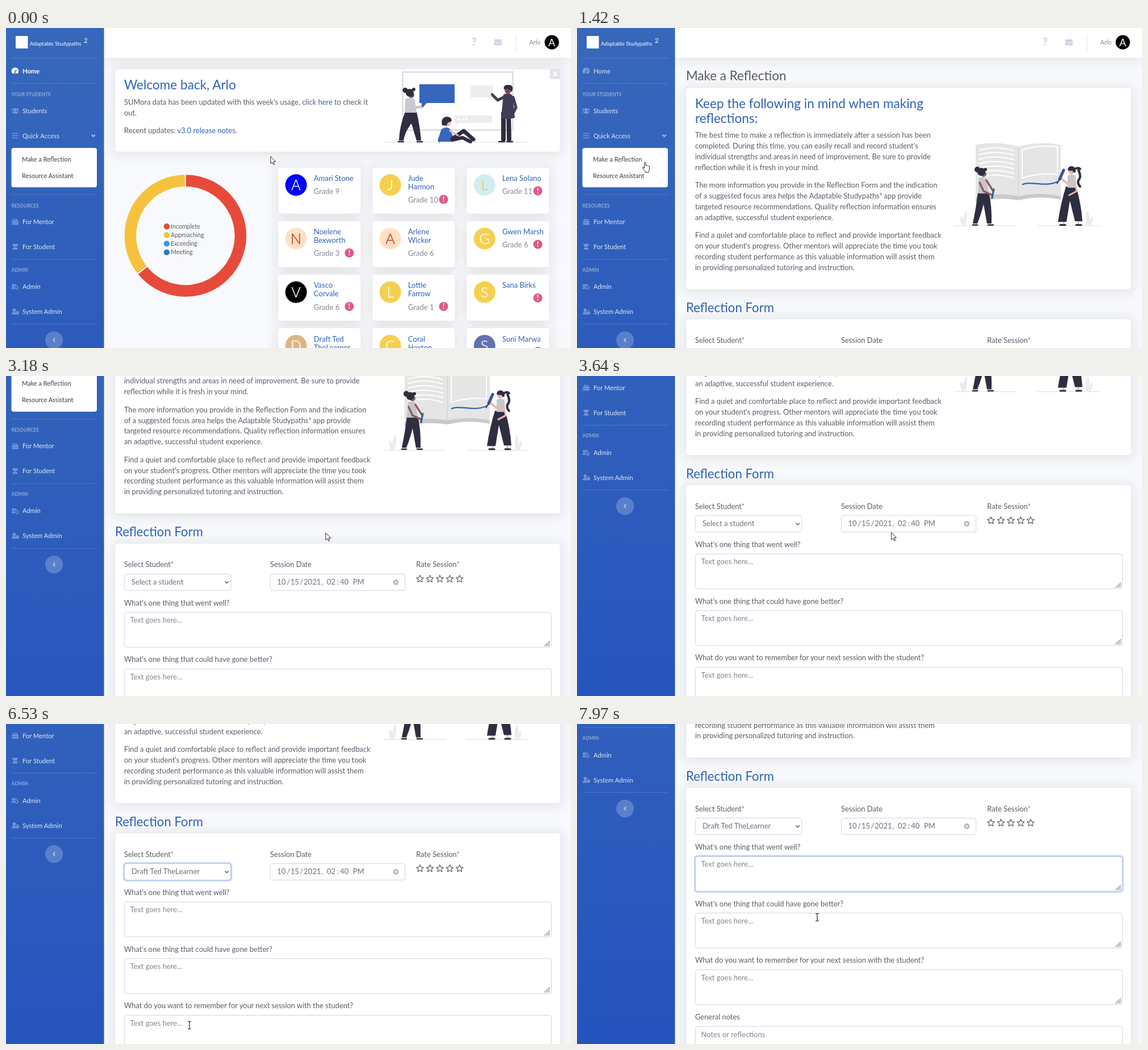
Write an HTML page that moves like this. It is 995x563 px and loops after 8000 ms.

```html
<!DOCTYPE html>
<html lang="en">
<head>
<meta charset="utf-8">
<title>Session reflection</title>
<style>
html, body { margin: 0; width: 100%; height: 100%; overflow: hidden; background: #f8f9fc; }
svg { display: block; width: 100vw; height: 100vh; font-family: Lato, "Open Sans", sans-serif; }
text { white-space: pre; }
.list { font-family: "Open Sans", "Noto Sans", sans-serif; font-size: 12px; }
</style>
</head>
<body>
<svg id="stage" viewBox="0 0 995 563" xmlns="http://www.w3.org/2000/svg"></svg>
<script>
const LOOP = 8000;
const BLUE = '#2d62b8', INK = '#5a5c69', SOFT = '#858796', DARK = '#2f2e41', BRAND = 'Adaptable Studypaths';

// ---- drawing helpers ----
const text = (x, y, s, size = 12.9, fill = INK, more = '') =>
  `<text x="${x}" y="${y}" font-size="${size}" fill="${fill}" ${more}>${s}</text>`;
const rect = (x, y, w, h, fill, r = 0, more = '') =>
  `<rect x="${x}" y="${y}" width="${w}" height="${h}" rx="${r}" fill="${fill}" ${more}/>`;
const dot = (x, y, r, fill) => `<circle cx="${x}" cy="${y}" r="${r}" fill="${fill}"/>`;
const shape = (d, fill) => `<path d="${d}" fill="${fill}"/>`;
const line = (d, color, w = 1, more = '') =>
  `<path d="${d}" fill="none" stroke="${color}" stroke-width="${w}" ${more}/>`;
const round = 'stroke-linecap="round" stroke-linejoin="round"';
const limb = (d, color, w) => line(d, color, w, round);
const group = (id, s, more = '') => `<g id="${id}" ${more}>${s}</g>`;
const card = (x, y, w, h) => rect(x, y, w, h, '#fff', 4, 'stroke="#e3e6f0" stroke-width=".8"');
const shadowed = s => `<g filter="url(#shade)">${s}</g>`;
const each = (list, fn) => list.map(fn).join('');

// ---- sidebar ----
const people = dot(16, -2.2, 2.6, '#fff') + dot(11.8, -2, 1.7, '#fff') + dot(20.2, -2, 1.7, '#fff') +
  shape('M11.7 5 q0 -4.3 4.3 -4.3 t4.3 4.3z M9.5 3.3 q0 -2.7 2.5 -2.7 l-1.3 2.7z M22.5 3.3 q0 -2.7 -2.5 -2.7 l1.3 2.7z', '#fff');
const person = dot(14.5, -2.6, 2.9, '#fff') + shape('M10 5 q0 -4.6 4.5 -4.6 q2 0 3 1 v3.6z', '#fff');
const icons = {
  gauge: shape('M11.2 4.5 a6.3 6.3 0 1 1 9.6 0z', '#fff') + line('M15.7 2.3 L18.4 -2.6', '#3767bd', 1.3) + dot(15.7, 2.3, 1.5, '#3767bd'),
  people,
  bars: line('M10.5 -4 h11 M10.5 0 h11 M10.5 4 h11', '#fff', 1.4),
  box: line('M13 -1.5 v-2.7 h6 v2.7', '#fff', 1.5) + rect(10.5, -1.8, 11.5, 7, '#fff', 1.2) + line('M10.5 1.7 h11.5', '#3161ba', .8),
  grad: shape('M11 -5 h10 v2 h-1.5 v3 h-7 v-3 h-1.5z M11.5 5 q0 -4 4.5 -4 t4.5 4z', '#fff'),
  cog: dot(12.5, -2, 2.4, '#fff') + shape('M9.5 4 q0 -3.6 3.5 -3.6 q2 0 2.5 3.6z', '#fff') + dot(16.8, -3, 1.7, '#fff') +
    `<circle cx="18.7" cy="2" r="2.6" fill="none" stroke="#fff" stroke-width="1.8" stroke-dasharray="1.7 .4"/>`,
  lock: person + rect(17.8, 0, 5, 5, '#fff', .8) + line('M18.9 .5 v-1.2 a1.4 1.4 0 0 1 2.8 0 v1.2', '#fff', 1)
};
const navRow = (y, label, icon) =>
  `<g transform="translate(0 ${y})" opacity=".34">${icons[icon]}</g>` + text(29, y + 4, label, 11.2, '#fff', 'opacity=".85"');
const navHead = (y, label) => text(9.5, y + 2.8, label, 8.4, '#fff', 'font-weight="800" opacity=".42"');

const sidebar =
  rect(0, 0, 172.6, 1400, 'url(#navFill)') +
  rect(17, 14, 21.5, 22, '#fff') + text(42, 31, BRAND, 9.4, '#fff') + text(137, 26, '2', 11.5, '#fff') +
  each([53, 97.5, 293, 407, 521], y => line(`M9.5 ${y} H160`, '#fff', .8, 'opacity=".2"')) +
  group('homeOn', `<g transform="translate(0 75.5)">${icons.gauge}</g>` + text(29, 79.5, 'Home', 11.2, '#fff', 'font-weight="bold"')) +
  group('homeOff', navRow(75.5, 'Home', 'gauge')) +
  navHead(117, 'YOUR STUDENTS') + navRow(145.5, 'Students', 'people') +
  navRow(189.5, 'Quick Access', 'bars') + line('M150.3 187.6 l3.4 3.4 l3.4 -3.4', '#fff', 1.9, 'opacity=".6"') +
  rect(9.5, 211, 150.5, 69.3, '#fff', 4) +
  group('hover', rect(16, 218, 138, 26.5, '#eaecf4', 4)) +
  text(28, 235, 'Make a Reflection', 11, '#3a3b45') + text(28, 264, 'Resource Assistant', 11, '#3a3b45') +
  navHead(313, 'RESOURCES') + navRow(341, 'For Mentor', 'box') + navRow(385, 'For Student', 'grad') +
  navHead(426, 'ADMIN') + navRow(455, 'Admin', 'cog') + navRow(499, 'System Admin', 'lock') +
  `<g opacity=".22">${dot(84.6, 549.3, 15.6, '#fff')}</g>` + line('M86.4 546 l-3.2 3.3 l3.2 3.3', '#fff', 1.5, 'opacity=".65"');

// ---- top bar ----
const topbar =
  shadowed(rect(173, -20, 822, 72.5, '#fff')) +
  text(820, 31, '?', 18, '#d1d3e2', 'font-weight="900"') +
  rect(859.5, 20, 13.5, 10.5, '#d1d3e2', 1.5) + line('M859.5 23 l6.7 4.2 l6.8 -4.2', '#fff', 1) +
  line('M898.7 11 V40', '#e3e6f0') +
  text(921.5, 28.5, 'Arlo', 10.8, SOFT) + dot(961.2, 25.2, 12.6, '#000') +
  text(961.2, 31.5, 'A', 18, '#fff', 'text-anchor="middle"');

// ---- home page ----
const teamArt =
  rect(698.5, 77.5, 194, 102, '#fff', 0, 'stroke="#e2e2e4" stroke-width="3"') +
  shape('M728 99 h62 v33 h-49 l-9 10 v-10 h-4z', '#3767bd') +
  shape('M818 101 h39 v21 h-3 v5 l-5 -5 h-31z M790 154 h66 v13 h-60 l-4 5 v-5 h-2z', '#ededee') +
  each([797, 804, 811], x => dot(x, 160.5, 2, '#fff')) +
  line('M664 201 H921', '#dcdce0', 1) +
  shape('M703 147 h20 Q729 172 731 198 H723 L714 168 Q703 181 700 198 H692 Q693 173 703 147z', DARK) +
  limb('M691 200 H700 M724 200 H733', DARK, 2.5) +
  shape('M703 125 q8 -5 17 0 l3 24 h-21z', '#c9c9d3') + limb('M706 128 L714 141 L733 138', '#c9c9d3', 5) +
  dot(734, 137, 2, '#7c4b55') + dot(714, 118, 5, '#7c4b55') + dot(711, 114, 7, DARK) + dot(703, 109.5, 4.5, DARK) + dot(718, 108, 3, DARK) +
  shape('M767 178 q9 -6 15 0 l7 17 q0 5 -5 5 h-18 l-6 -2z', '#3767bd') + limb('M768 181 L763 199', '#3767bd', 4) +
  limb('M786 195 L806 181 L823 196', DARK, 7) + limb('M786 197 L804 193 L818 200', DARK, 6) + limb('M782 181 L796 189', '#f2b6ae', 3) +
  dot(778, 167, 5.5, '#f2b6ae') + shape('M768 171 q-3 -13 8 -15 q11 1 8 9 q-7 -1 -8 7z', DARK) +
  limb('M876 150 L876 196', DARK, 8) + limb('M885 150 L886 196', DARK, 8) + limb('M868 200 H878 M882 200 H892', DARK, 2.5) +
  shape('M876 117 q12 -5 16 3 l4 38 q-14 4 -24 0z', '#3f3d56') +
  limb('M876 122 L866 127 L857 118', '#3f3d56', 5) + limb('M893 122 L898 140 L891 153', '#3f3d56', 5) +
  dot(856, 116.5, 2.3, '#7c4b55') + dot(884, 110, 5.8, '#7c4b55') + shape('M877 108 q-2 -8 7 -8 q10 0 8 9 q-2 5 -3 2 q-1 -5 -12 -3z', DARK);

const pupils = [
  ['Amari Stone', '', 'Grade 9', '#0000ff', '#fff', 0],
  ['Jude', 'Harmon', 'Grade 10', '#f5d04f', '#fff', 1],
  ['Lena Solano', '', 'Grade 11', '#d1edf3', '#f1cb48', 1],
  ['Noelene', 'Bexworth', 'Grade 3', '#fee1c2', '#c0392b', 1],
  ['Arlene', 'Wicker', 'Grade 6', '#fee1c2', '#c0392b', 0],
  ['Gwen Marsh', '', 'Grade 6', '#f5d04f', '#fff', 1],
  ['Vasco', 'Corvale', 'Grade 6', '#000', '#fff', 1],
  ['Lottie', 'Farrow', 'Grade 1', '#f5d04f', '#fff', 1],
  ['Sana Birks', '', '', '#f5d04f', '#fff', 1],
  ['Draft Ted', 'TheLearner', '', '#deb684', '#fff', 0],
  ['Coral', 'Hexton', '', '#f5d04f', '#fff', 0],
  ['Suni Marwa', '', '', '#6172ae', '#fff', 1]
];
const place = i => [479 + i % 3 * 166, 245 + Math.floor(i / 3) * 94.2];
const pupil = ([first, last, grade, back, ink, alert], i) => {
  const [x, y] = place(i), low = last ? 15 : 0;
  return dot(x + 31.8, y + 31.3, 19, back) +
    text(x + 31.8, y + 40.3, first[0], 25, ink, 'text-anchor="middle" font-weight="300" stroke-width=".4" stroke="' + ink + '"') +
    text(x + 63, y + 24, first, 13, BLUE) + text(x + 63, y + 39, last, 13, BLUE) +
    text(x + 63, y + 47.2 + low, grade, 13, SOFT) +
    (alert ? dot(x + 125.6, y + 41.5 + low, 8, '#dc5a8c') +
      text(x + 125.6, y + 46 + low, '!', 12.5, '#fff', 'text-anchor="middle" font-weight="bold"') : '');
};

const ringPoint = deg => {
  const a = deg * Math.PI / 180;
  return `${316 + 97 * Math.sin(a)} ${365.5 - 97 * Math.cos(a)}`;
};
const arc = (from, to, color) =>
  line(`M${ringPoint(from)} A97 97 0 ${to - from > 180 ? 1 : 0} 1 ${ringPoint(to)}`, color, 20.5);
const legend = [['Incomplete', '#e74a3b'], ['Approaching', '#f6c23e'], ['Exceeding', '#3b96dd'], ['Meeting', '#2d7fb1']];
const link = s => `<tspan fill="${BLUE}">${s}</tspan>`;

const home =
  shadowed(card(192, 72, 784, 146) + each(pupils, (p, i) => card(...place(i), 146, 82))) +
  text(208, 108, 'Welcome back, Arlo', 22.6, BLUE) +
  text(208, 134.7, `SUMora data has been updated with this week's usage, click ${link('here')} to check it`) +
  text(208, 153.5, 'out.') +
  text(208, 185, `Recent updates: ${link('v3.0 release notes.')}`) +
  teamArt +
  rect(958, 72, 18, 18, '#e3e4e8') + line('M963.5 77.5 l7 7 m0 -7 l-7 7', '#fff', 2.2) +
  arc(.6, 230.8, '#e74a3b') + arc(232, 359.4, '#f6c23e') +
  each(legend, ([name, color], i) => dot(283, 349 + i * 15.2, 5.2, color) + text(290.3, 352.8 + i * 15.2, name, 10.5)) +
  each(pupils, pupil);

// ---- reflection page ----
const bookArt =
  shape('M702 206 Q740 198 777 209 Q815 198 852 206 V302 Q815 294 777 303 Q740 297 702 306z', '#c9c9ca') +
  shape('M702 206 Q740 198 777 209 Q815 198 852 206 V296 Q815 288 777 296 Q740 288 702 299z', '#e5e5e6') +
  line('M777.3 209 V302', '#d0d0d2', 1) +
  each([0, 1, 2, 3, 4, 5, 6], i => line(`M708 ${215 + i * 8} Q738 ${206 + i * 8} 770 ${216 + i * 8}`, '#fff', 2)) +
  line('M784 214 Q815 205 846 209 V258 Q815 254 784 264z', '#fff', 2) +
  line('M784 275.5 C798 268 826 281 847 270', '#2d62b8', 2.2) +
  line('M664 348 H774 M811 348 H921', '#dcdce0', 1) +
  shape('M678 347 q-6 -13 -1 -17 q4 5 3 10 q1 -14 6 -20 q3 13 -2 27z M897 347 q-3 -15 2 -27 q5 10 3 20 q2 -6 5 -8 q3 8 -3 15z', '#ececee') +
  shape('M706 289 h19 Q731 312 730 344 H722 L716 310 Q711 330 705 344 H697 Q703 316 706 289z', DARK) +
  limb('M697 346.5 H705 M724 346.5 H733', DARK, 2.5) +
  shape('M708 264 q8 -4 13 1 l4 26 h-19z', '#c6c6c8') + limb('M709 272 L716 287 L731 294', '#915a5c', 3.4) +
  limb('M721 268 L733 287', '#915a5c', 3.4) + limb('M734 284 L731 299', '#3b5f9f', 3.4) +
  dot(716, 257, 5, '#915a5c') + dot(712, 253, 7, DARK) + dot(705, 249, 5, DARK) + dot(719, 249, 3, DARK) +
  limb('M883 250 q6 12 0 18 q-2 6 3 11', DARK, 4) + limb('M875 249 q8 -5 11 -1', DARK, 4) +
  limb('M857 340 V344 M883 339 V344', '#f4b6ae', 3) +
  shape('M861 279 h18 Q888 310 890 340 H877 L868 304 L862 341 H847 Q852 308 861 279z', DARK) +
  limb('M851 346.5 H860 M879 346.5 H888', DARK, 3) +
  shape('M864 260 q9 -5 14 1 l1 20 h-15z', '#c6c6c8') + limb('M864 274 L852 264', '#f4b6ae', 4) + limb('M876 268 L880 287 L867 294', '#f4b6ae', 3) +
  limb('M857 250 L850 266', '#3556a0', 5) + line('M850 266 L845 274', '#2d3f78', 2) +
  dot(870, 252, 5.2, '#f4b6ae') + shape('M864 250 q1 -8 8 -7 q7 2 6 10 q-4 4 -5 -2 q-4 1 -9 -1z', DARK);

const advice = [
  [189, 'The best time to make a reflection is immediately after a session has been',
    "completed. During this time, you can easily recall and record student's",
    'individual strengths and areas in need of improvement. Be sure to provide',
    'reflection while it is fresh in your mind.'],
  [277, 'The more information you provide in the Reflection Form and the indication',
    `of a suggested focus area helps the ${BRAND}² app provide`,
    'targeted resource recommendations. Quality reflection information ensures',
    'an adaptive, successful student experience.'],
  [365, 'Find a quiet and comfortable place to reflect and provide important feedback',
    "on your student's progress. Other mentors will appreciate the time you took",
    'recording student performance as this valuable information will assist them',
    'in providing personalized tutoring and instruction.']
];
const field = (x, y, w, h, id = '') =>
  rect(x, y, w, h, '#fff', 4, 'stroke="#d1d3e2"') +
  (id ? group(id, rect(x - 1, y - 1, w + 2, h + 2, 'none', 5, 'stroke="#4e73df" stroke-opacity=".28" stroke-width="3"') +
    rect(x, y, w, h, 'none', 4, 'stroke="#bac8f3"')) : '');
const star = x => {
  let d = '';
  for (let i = 0; i < 10; i++) {
    const a = i * Math.PI / 5, r = i % 2 ? 3.1 : 6.6;
    d += `${i ? 'L' : 'M'}${(x + r * Math.sin(a)).toFixed(2)} ${(574.7 - r * Math.cos(a)).toFixed(2)}`;
  }
  return line(d + 'z', INK, 1.2, 'stroke-linejoin="round"');
};
const must = '<tspan fill="#d4603a">*</tspan>';
const areas = [["What's one thing that went well?", 'Text goes here...'],
  ["What's one thing that could have gone better?", 'Text goes here...'],
  ['What do you want to remember for your next session with the student?', 'Text goes here...'],
  ['General notes', 'Notes or reflections']];
const area = ([label, hint], i) => {
  const y = 633.4 + i * 99.7;
  return text(208, y - 12, label) + field(208.4, y, 752, 61.5, i ? '' : 'areaFocus') + text(218.5, y + 18.5, hint, 13, SOFT) +
    line(`M948 ${y + 59.5} l10 -9 M951.5 ${y + 59.5} l6.5 -6 M955 ${y + 59.5} l3 -2.8`, '#55565f', 1);
};
const dateBits = [[477.5, '10'], [494.5, '/'], [501, '15'], [517.5, '/'], [524.3, '2021'], [555.5, ','], [565, '02'], [583, ':'], [588.3, '40'], [611, 'PM']];

const form =
  shadowed(card(192, 105, 784, 355) + card(192, 512, 784, 700)) +
  text(192, 92, 'Make a Reflection', 22.4) +
  text(208, 140.7, 'Keep the following in mind when making', 22.6, BLUE) + text(208, 167.3, 'reflections:', 22.6, BLUE) +
  each(advice, ([y, ...rows]) => each(rows, (s, i) => text(208, y + 4.4 + i * 18.85, s))) +
  bookArt +
  text(192, 500, 'Reflection Form', 22.2, BLUE) +
  text(208, 554, 'Select Student' + must) + text(465, 554, 'Session Date') + text(722.3, 554, 'Rate Session' + must) +
  field(208.4, 566, 187.6, 29, 'pickFocus') + text(221, 584.8, '', 13, '#6e707e', 'id="picked"') +
  line('M385.5 579 l3.2 3.2 l3.2 -3.2', '#4a4b55', 1.3) +
  field(465.4, 566, 237.4, 29) + each(dateBits, ([x, s]) => text(x, 584.8, s, 13, '#6e707e')) +
  dot(686.4, 580.4, 4.8, '#b3b3b8') + line('M684.4 578.4 l4 4 m0 -4 l-4 4', '#fff', 1.1) +
  each([729, 746.5, 764, 781.5, 798.8], star) +
  each(areas, area) +
  group('caret', rect(218, 639.5, 1, 17, '#333'));

// ---- student list ----
const ROW = 24.85, LIST_TOP = 279;
const names = ['Select a student', ...pupils.map(p => (p[0] + ' ' + p[1]).trim())];
const rowText = (s, i) => text(213.3, LIST_TOP + 17 + i * ROW, s, 12, '#6e707e');
const list =
  rect(210, 277, 188, 300, '#000', 0, 'opacity=".35"') +
  rect(208.5, 275.5, 187.5, 300, '#fff', 0, 'stroke="#62626c"') +
  each(names, rowText) +
  group('mark', rect(209, 0, 173.5, ROW, '#4f4d5b') + text(213.3, 17, '', 12, '#fff', 'id="markText"')) +
  rect(382.6, 278, 13, 290, '#f0f0f0') + rect(383.2, 292, 11.8, 290, '#cdcdcd') +
  line('M386 287.3 l3 -3 l3 3', '#505050', 1.5);

// ---- pointers ----
const arrow = '<path d="M0 0 V12.6 L2.9 9.9 L5 14.6 L7 13.7 L5 9.1 H8.8z" fill="#fff" stroke="#111" stroke-width=".9"/>';
const hand = '<path d="M-1.4 1 q1.4 -1.8 2.6 0 V6.3 q1.3 -1 2.2 .2 q1.4 -.8 2.2 .4 q1.6 -.5 1.9 1 V12 q0 2.5 -1.5 4.4 V18 H-.2 V16.5 Q-2.3 13.8 -4.4 10.6 q-.3 -1.8 1.4 -1.5 L-1.4 11z" fill="#fff" stroke="#111" stroke-width=".9"/>';
const beam = line('M-3 -6.5 h2 l1 .8 l1 -.8 h2 M0 -5.8 V5.8 M-3 6.5 h2 l1 -.8 l1 .8 h2', '#222', 1.2);

const stage = document.getElementById('stage');
stage.innerHTML =
  `<defs>
    <linearGradient id="navFill" gradientUnits="userSpaceOnUse" x1="0" y1="0" x2="0" y2="1080">
      <stop offset="0" stop-color="#3768bb"/><stop offset="1" stop-color="#2350be"/>
    </linearGradient>
    <filter id="shade" filterUnits="userSpaceOnUse" x="150" y="-60" width="880" height="1320">
      <feDropShadow dx="0" dy="2" stdDeviation="10" flood-color="#3a3b45" flood-opacity=".15"/>
    </filter>
  </defs>` +
  rect(0, 0, 995, 563, '#f8f9fc') +
  group('page', group('home', home) + group('form', form) + topbar + sidebar) +
  group('list', list, 'class="list"') +
  group('pointer', group('arrow', arrow) + group('hand', hand) + group('beam', beam));

const el = {};
stage.querySelectorAll('[id]').forEach(n => { el[n.id] = n; });

// ---- motion ----
const clamp = v => Math.max(0, Math.min(1, v));
const smooth = v => v * v * (3 - 2 * v);
const show = (id, on) => el[id].setAttribute('opacity', +on);

// wheel notches: start times, 80px each
const notches = [2613, 2835, 3050, 3300, 7430];
const scrollAt = t => notches.reduce((sum, s) => sum + 80.1 * (1 - (1 - clamp((t - s) / 290)) ** 2.1), 0);

// time, x, y; a trailing 1 eases into that point
const path = [[0, 466, 226], [40, 466, 226], [300, 335, 218], [600, 190, 220], [850, 124, 234], [1110, 120, 236], [1900, 120, 236],
  [2250, 558, 269, 1], [2600, 558, 269], [2700, 563, 276], [3570, 563, 276], [4130, 352, 262, 1], [4500, 352, 262],
  [4960, 353, 336], [5330, 352, 441], [5850, 326, 535], [6470, 325, 535], [6530, 323, 530], [6950, 417, 335, 1],
  [7080, 417, 335], [7300, 423, 340], [LOOP, 423, 340]];
function pointerAt(t) {
  const i = Math.max(1, path.findIndex(p => p[0] > t));
  const [t0, x0, y0] = path[i - 1], [t1, x1, y1, eased] = path[i];
  const k = clamp((t - t0) / (t1 - t0)), e = eased ? smooth(k) : k;
  return [x0 + (x1 - x0) * e, y0 + (y1 - y0) * e];
}

const PAGE = 1360, OPEN = 4220, PICK = 6050, CLICK = 7090;
function draw(t) {
  const [x, y] = pointerAt(t), onForm = t >= PAGE, open = t >= OPEN && t < PICK;
  const overItem = x > 16 && x < 154 && y > 217 && y < 245 && t < 2300;
  const focus = clamp((t - CLICK) / 160);

  show('home', !onForm); show('homeOn', !onForm);
  show('form', onForm); show('homeOff', onForm);
  show('hover', overItem && !(onForm && t < 1470));
  el.page.setAttribute('transform', `translate(0 ${-scrollAt(t)})`);

  el.picked.textContent = t < PICK ? names[0] : names[10];
  show('pickFocus', t < 4180 ? 0 : 1 - focus);
  show('areaFocus', focus);
  show('caret', t >= CLICK + 30 && t < 7970);

  show('list', open);
  const row = Math.max(0, Math.min(10, Math.floor((y - LIST_TOP) / ROW)));
  el.mark.setAttribute('transform', `translate(0 ${LIST_TOP + row * ROW})`);
  el.markText.textContent = names[row];

  el.pointer.setAttribute('transform', `translate(${x.toFixed(1)} ${y.toFixed(1)})`);
  show('hand', overItem); show('beam', t >= PICK); show('arrow', !overItem && t < PICK);
}

const start = performance.now();
function tick() {
  draw((performance.now() - start) % LOOP);
  requestAnimationFrame(tick);
}
draw(0);
requestAnimationFrame(tick);
</script>
</body>
</html>
```
